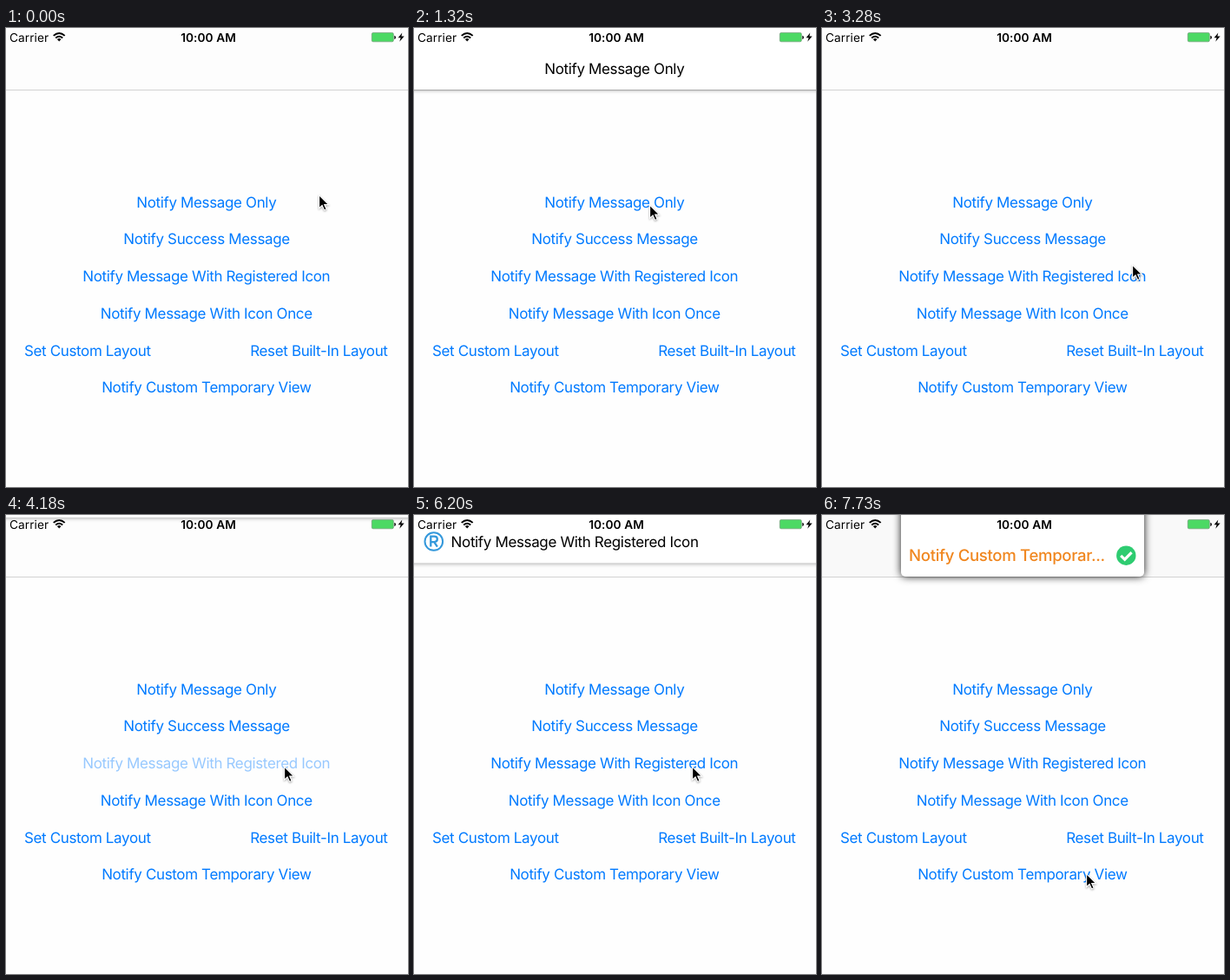
These frames come from a looping animation (463x529 px, 8 s). An HTML page:

```html
<!DOCTYPE html>
<html lang="en">
<head>
<meta charset="utf-8">
<title>Notification demo</title>
<style>
html, body { margin: 0; width: 100%; height: 100%; overflow: hidden; background: #fefefe; }
svg { display: block; width: 463px; height: 529px; }
text { font: 400 17px Inter, "Open Sans", sans-serif; letter-spacing: -0.36px; white-space: pre; text-rendering: geometricPrecision; }
.mid { text-anchor: middle; }
#links text { fill: #007aff; }
.status text { font-size: 13.7px; letter-spacing: 0.05px; }
.status .time { font-weight: 600; }
.sheet { fill: #fff; filter: drop-shadow(0 1px 2.2px rgba(0, 0, 0, .33)); }
.card { fill: #fff; filter: drop-shadow(0 0 5px rgba(0, 0, 0, .9)); }
</style>
</head>
<body>
<svg viewBox="0 0 463 529">
  <rect width="463" height="529" fill="#fefefe"/>
  <rect id="bar" width="463" height="71"/>
  <path d="M0 71.5H463" stroke="#d2d2d2"/>
  <g id="links"></g>

  <g id="plain">
    <rect class="sheet" x="-10" y="-60" width="483" height="131"/>
    <text class="mid" x="230.8" y="52.5">Notify Message Only</text>
  </g>

  <g id="icon">
    <rect class="sheet" x="-10" y="-60" width="483" height="131"/>
    <circle cx="22.8" cy="46.2" r="10.3" fill="none" stroke="#3498db" stroke-width="2"/>
    <path d="M19.3 52.2V40.3H23.3C28 40.3 28 46.7 23.3 46.7H19.3M23.2 46.7L26.9 52.2" fill="none" stroke="#3498db" stroke-width="2.3"/>
    <text x="42.6" y="52.5">Notify Message With Registered Icon</text>
  </g>

  <g id="custom">
    <rect class="card" x="91" y="-60" width="280" height="131" rx="5"/>
    <text x="100" y="53" style="fill:#f0861e;font-size:18.6px;font-weight:500;letter-spacing:-.33px">Notify Custom Temporar...</text>
    <circle cx="350.3" cy="46.7" r="11.2" fill="#2ecc71"/>
    <path d="M344.2 46.8L348.7 51.2L356.6 43.2" fill="none" stroke="#fff" stroke-width="3.2"/>
  </g>

  <g class="status">
    <text x="4" y="15.6">Carrier</text>
    <g fill="none" stroke="#000" stroke-width="1.9">
      <path d="M54.7 8.9Q61.2 3.2 67.7 8.9"/>
      <path d="M57.2 11.5Q61.2 8 65.2 11.5"/>
    </g>
    <path d="M58.9 13Q61.2 11.2 63.5 13L61.2 15.4Z"/>
    <text class="time mid" x="233" y="15.6">10:00 AM</text>
    <rect x="421.3" y="5.4" width="25" height="10.4" rx="1.6" fill="#4cd964" stroke="#6f9a76" stroke-width=".7"/>
    <path d="M447.3 8.7Q449 9 449 10.8Q449 12.6 447.3 12.9Z"/>
    <path d="M456.3 5.4L451.6 11.2H454.6L453.3 15.8L458.6 9.5H455.4Z"/>
  </g>

  <path id="cursor" d="M-.4 -.8V14.2L3.1 11L5.6 16.4L8.1 15.3L5.7 10.1H10.6Z" stroke="#fff" stroke-width="1.1" style="filter:drop-shadow(0 1px 1px rgba(0,0,0,.35))"/>
</svg>
<script>
const LOOP = 8000, STEP = 60, HIDE = -76;
const $ = id => document.getElementById(id);

const links = [
  [230.8, 206.5, "Notify Message Only"],
  [231.1, 249.3, "Notify Success Message"],
  [230.8, 292, "Notify Message With Registered Icon"],
  [230.8, 334.8, "Notify Message With Icon Once"],
  [93.8, 377.6, "Set Custom Layout"],
  [360.4, 377.6, "Reset Built-In Layout"],
  [230.8, 420.4, "Notify Custom Temporary View"]
].map(([x, y, label]) => {
  const el = document.createElementNS("http://www.w3.org/2000/svg", "text");
  el.setAttribute("x", x);
  el.setAttribute("y", y);
  el.setAttribute("class", "mid");
  el.textContent = label;
  $("links").append(el);
  return el;
});

// start and end of each banner's drop and rise
const banners = [
  { el: $("plain"), first: 900, drop: 872, settle: 1320, rise: 2718 },
  { el: $("icon"), first: 4180, drop: 4153, settle: 4580, rise: 6156 },
  { el: $("custom"), first: 7440, drop: 7412, settle: 7730, rise: Infinity }
];

const presses = [
  { el: links[0], down: 720, up: 900 },
  { el: links[2], down: 4000, up: 4180 },
  { el: links[6], down: 7270, up: 7440 }
];

// time, x, y
const path = [
  [0, 361, 193.5], [60, 350, 195], [180, 309, 201], [300, 275, 204.5], [360, 272, 205],
  [2980, 272, 205], [3100, 300, 226], [3280, 358, 274], [3340, 360, 284], [3460, 334, 296],
  [3520, 327, 297], [3580, 323, 293], [3640, 321, 291],
  [6430, 321, 291], [6550, 315, 345], [6670, 309, 405], [6790, 307, 429],
  [6910, 307, 429], [6970, 305.5, 420], [7030, 305, 414.5]
];

const hold = (t, start) => t < start ? t : start + Math.floor((t - start) / STEP) * STEP;
const spring = ms => ms <= 0 ? 0 : 1 - Math.exp(-.02 * ms) * (1 + .02 * ms);

function bannerY(b, t) {
  if (t < b.first) return HIDE;
  if (t < b.settle) return HIDE * (1 - spring(hold(t, b.first) - b.drop));
  if (t < b.rise + 42) return 0;
  return HIDE * spring(hold(t, b.rise + 42) - b.rise);
}

function cursorAt(t) {
  const origin = t < 2760 ? 0 : t < 6200 ? 2740 : 6190;
  const q = t >= 7030 ? 7030 : hold(t, origin);
  const i = path.findIndex(p => p[0] > q);
  if (i < 0) return path[path.length - 1].slice(1);
  const [t0, x0, y0] = path[i - 1], [t1, x1, y1] = path[i];
  const k = (q - t0) / (t1 - t0);
  return [x0 + (x1 - x0) * k, y0 + (y1 - y0) * k];
}

function draw(t) {
  $("bar").setAttribute("fill", t < 6260 ? "#fdfdfd" : "#f9f9f9");
  for (const b of banners) {
    const y = bannerY(b, t);
    b.el.setAttribute("transform", `translate(0 ${y.toFixed(2)})`);
    b.el.style.visibility = y < -74.5 ? "hidden" : "visible";
  }
  for (const p of presses) {
    const back = Math.min(1, Math.max(0, (hold(t, p.up) - p.up + STEP) / 240));
    p.el.style.opacity = t < p.down ? 1 : t < p.up ? .2 : .2 + .8 * back;
  }
  $("cursor").setAttribute("transform", `translate(${cursorAt(t).join(" ")})`);
}

function tick() {
  draw(performance.now() % LOOP);
  requestAnimationFrame(tick);
}
tick();
</script>
</body>
</html>
```
